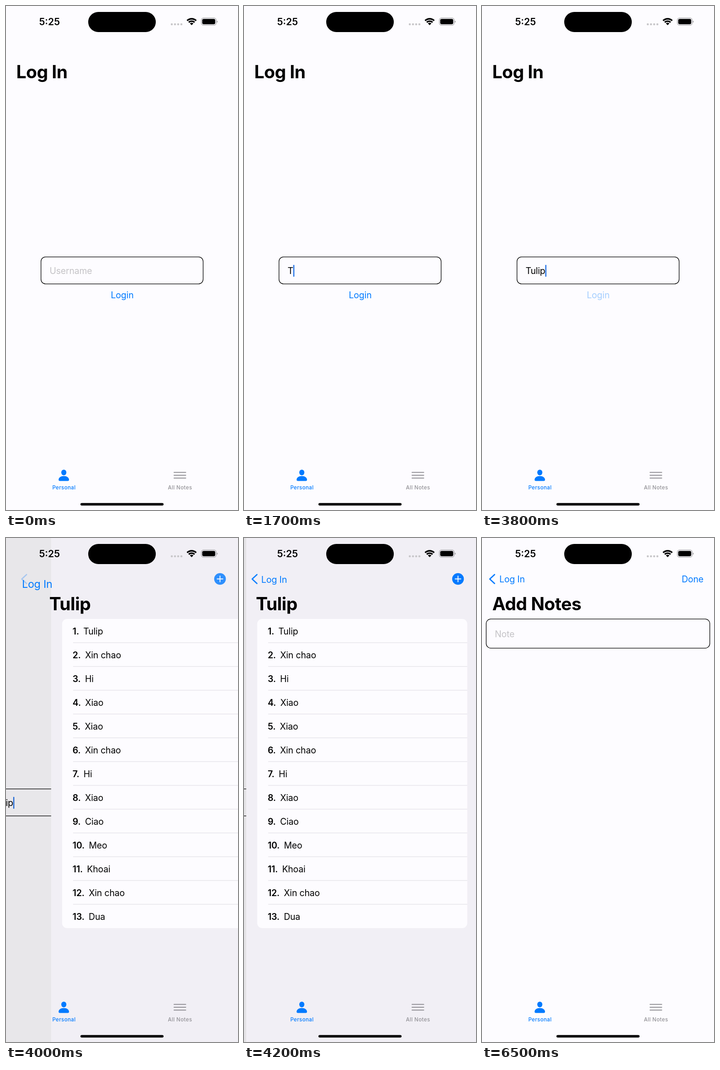
Recreate the animation shown at these times as an HTML page. Size 508 by 1102 pixels, loop 8 s.

```html
<!DOCTYPE html>
<html lang="en">
<head>
<meta charset="utf-8">
<title>Notes app</title>
<style>
  html, body { margin: 0; width: 100%; height: 100%; overflow: hidden; background: #fdfcff; }
  svg { display: block; width: 508px; height: 1102px; }
  text { font: 400 19.4px Inter, sans-serif; letter-spacing: -.15px; white-space: pre; }
  .title { font-size: 39px; font-weight: 700; letter-spacing: -.5px; }
  .num { font-weight: 600; }
  .clock { font-size: 21px; font-weight: 600; letter-spacing: 0; }
  .tab { font-size: 11.5px; font-weight: 500; letter-spacing: .4px; text-anchor: middle; }
  .blue { fill: #007aff; }
  .hint { fill: #c4c3c6; }
  .field { fill: none; stroke: #000; stroke-width: 1.3; }
</style>
</head>
<body>
<svg viewBox="0 0 508 1102">
  <g id="login">
    <rect class="field" x="76.6" y="548.6" width="355" height="59" rx="10"/>
    <text id="hint" class="hint" x="95.5" y="586">Username</text>
    <text id="typed" x="95.5" y="586"></text>
    <rect id="caret" y="566" width="2.4" height="26" rx="1" fill="#1f6fe5"/>
    <text id="button" class="blue" x="254.5" y="639" text-anchor="middle">Login</text>
  </g>
  <rect id="dim" width="508" height="1102"/>
  <g id="list">
    <rect width="508" height="1102" fill="#f1eff5"/>
    <rect x="24" y="177" width="460" height="676" rx="11" fill="#fdfcff"/>
    <g id="rows"></g>
  </g>
  <g id="notes">
    <rect class="field" x="9.2" y="177.2" width="489.6" height="63.6" rx="10"/>
    <text class="hint" x="28" y="216.5">Note</text>
    <text class="blue" x="485" y="97" text-anchor="end">Done</text>
  </g>

  <text id="loginTitle" class="title">Log In</text>
  <g id="back">
    <path id="chevron" d="M27.5 80 17 89.7 27.5 99.4" fill="none" stroke="#007aff"
      stroke-width="2.7" stroke-linecap="round" stroke-linejoin="round"/>
    <text id="backLabel" class="blue">Log In</text>
  </g>
  <text id="title" class="title" y="158"></text>
  <g id="plus">
    <circle class="blue" cx="468.6" cy="89.5" r="12.8"/>
    <path d="M462.4 89.5h12.4M468.6 83.3v12.4" stroke="#fff" stroke-width="1.9" stroke-linecap="round"/>
  </g>

  <text class="clock" x="72.5" y="42">5:25</text>
  <rect x="180" y="13" width="148" height="44" rx="22"/>
  <path d="M363 40h.01m7 0h.01m7 0h.01m7 0h.01" stroke="#c8c7ca" stroke-width="4.6" stroke-linecap="round"/>
  <path d="M396.6 32.1a14 14 0 0 1 19.8 0M400.2 35.7a8.9 8.9 0 0 1 12.6 0" fill="none" stroke="#000" stroke-width="3.4"/>
  <path d="M406.5 42l-3.9-3.9a5.5 5.5 0 0 1 7.8 0z"/>
  <rect x="427.6" y="26.1" width="32.8" height="16" rx="5" fill="none" stroke="#a3a2a6" stroke-width="1.2"/>
  <rect x="429.6" y="28.2" width="28.6" height="11.8" rx="3.4"/>
  <path d="M461.6 31.8q2 .6 2 2.4t-2 2.4z" fill="#a3a2a6"/>

  <g class="blue">
    <ellipse cx="126.6" cy="1020" rx="5.6" ry="6.2"/>
    <path d="M115.2 1036c0-5 4.900-8.200 11.400-8.200s11.400 3.200 11.400 8.200q0 2.400-2.700 2.400h-17.400q-2.700 0-2.700-2.400z"/>
    <text class="tab" x="127" y="1057">Personal</text>
  </g>
  <path d="M368 1019.700h25.500m-25.500 6.300h25.500m-25.500 6.300h25.500" stroke="#929196" stroke-width="2.100" stroke-linecap="round"/>
  <text class="tab" x="381" y="1057" fill="#929196">All Notes</text>
  <rect x="163" y="1086.700" width="182" height="5.600" rx="2.800"/>
</svg>
<script>
const LOOP = 8000, STEP = 100, WIDTH = 508;
const USER = 'Tulip';
const KEY_TIMES = [1600, 2000, 2100, 2300, 2400];
const PRESS = 3700, PUSH = 3834, SETTLED = 4400, ADD_NOTE = 6500;
const ITEMS = [USER, 'Xin chao', 'Hi', 'Xiao', 'Xiao', 'Xin chao', 'Hi', 'Xiao', 'Ciao', 'Meo', 'Khoai', 'Xin chao', 'Dua'];

const el = id => document.getElementById(id);
const show = (id, opacity) => el(id).setAttribute('opacity', opacity);
const move = (id, x, y = 0, scale = 1) =>
  el(id).setAttribute('transform', `translate(${x} ${y}) scale(${scale})`);
const mix = (a, b, k) => a + (b - a) * k;

el('rows').innerHTML = ITEMS.map((item, i) => {
  const y = 210.5 + 52 * i;
  const line = i < ITEMS.length - 1 ? `<path d="M48 ${y + 18.3}H484" stroke="#e3e2e7" stroke-width="1.2"/>` : '';
  return `<text x="47" y="${y}"><tspan class="num">${i + 1}.</tspan><tspan dx="9.4">${item}</tspan></text>${line}`;
}).join('');

// The caret fades out and in again, with one half-lit step each way.
function caretOpacity(t) {
  if (t < 500) return 0;
  for (const off of [1100, 3100]) {
    if (t === off || t === off + 300) return .5;
    if (t > off && t < off + 300) return 0;
  }
  return 1;
}

// Critically damped spring: share of the push still to travel.
function pushLeft(t) {
  if (t >= SETTLED) return 0;
  const k = Math.max(0, t - PUSH) * .01826;
  return Math.exp(-k) * (1 + k);
}

function draw(t) {
  const text = USER.slice(0, KEY_TIMES.filter(k => t >= k).length);
  const left = pushLeft(t), done = 1 - left;
  const pushed = t >= PUSH, adding = t >= ADD_NOTE;

  el('typed').textContent = text;
  show('hint', text ? 0 : 1);
  el('caret').setAttribute('x', 95.5 + (text ? el('typed').getComputedTextLength() : 0));
  show('caret', caretOpacity(t));
  show('button', t < PRESS ? 1 : .35);

  move('login', -.3 * WIDTH * done);
  show('login', t < SETTLED ? 1 : 0);
  show('dim', t < SETTLED ? .1 * done : 0);
  move('list', WIDTH * left);
  show('list', pushed && !adding ? 1 : 0);
  show('notes', adding ? 1 : 0);

  // The large title shrinks into the back label.
  const big = Math.max(0, 2 * left - 1);
  const x = mix(38, 22.5, left), y = mix(97, 158, left);
  move('loginTitle', x, y, mix(.5, 1, left));
  show('loginTitle', big);
  move('backLabel', x, y, 1 + left);
  show('backLabel', 1 - big);
  move('chevron', 90 * left);
  show('chevron', done ** 6);
  show('back', pushed ? 1 : 0);

  el('title').textContent = adding ? 'Add Notes' : USER;
  move('title', 22.5 + .73 * WIDTH * left);
  show('title', pushed ? 1 : 0);
  show('plus', pushed && !adding ? done : 0);
}

function tick() {
  const t = performance.now() % LOOP;
  draw(Math.floor(t / STEP) * STEP);
  requestAnimationFrame(tick);
}
tick();
</script>
</body>
</html>
```
